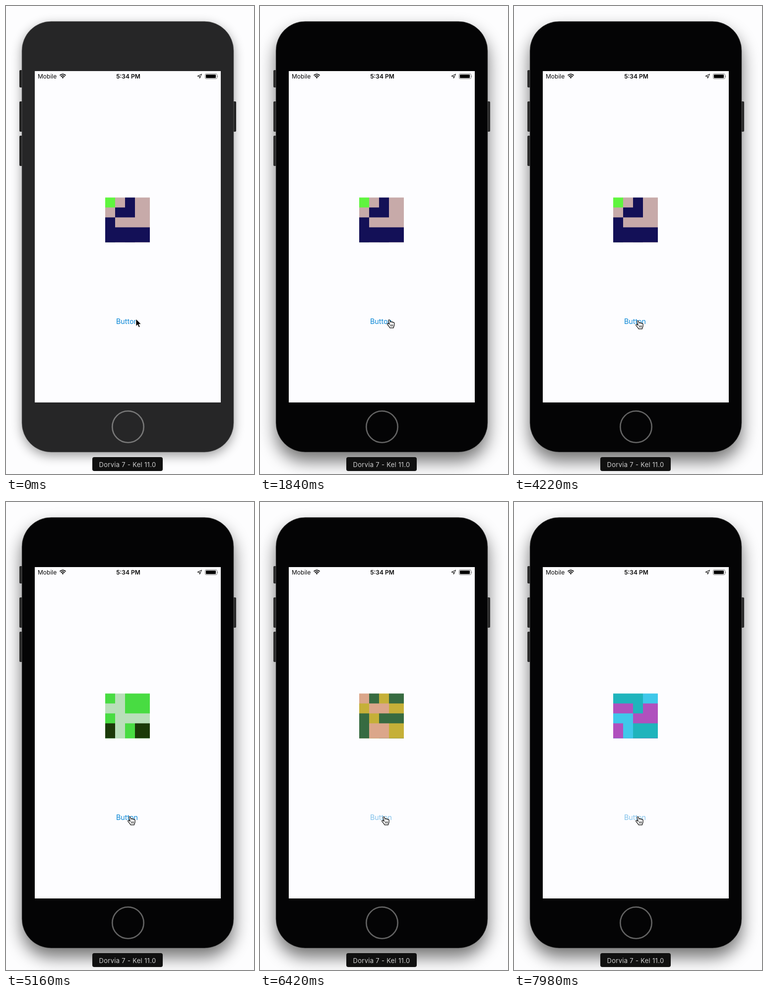
Animation of 500 by 942 pixels, one loop 8 s. Source, as an HTML page:

```html
<!DOCTYPE html>
<html lang="en">
<head>
<meta charset="utf-8">
<title>Phone simulator</title>
<style>
  html, body { margin: 0; width: 100%; height: 100%; overflow: hidden; background: #fdfdfe; }
  svg { display: block; width: 100%; height: 100%; }
  text { font-family: Inter, Roboto, sans-serif; }
  .idle { --body: #262627; --side: #222222; --ring: #787878; }
  .active { --body: #040405; --side: #2a2a2a; --ring: #646464; }
  .idle .deep, .active .light { display: none; }
</style>
</head>
<body>
<svg id="stage" class="idle" viewBox="0 0 500 942">
  <defs>
    <filter id="soft" x="-20%" y="-20%" width="140%" height="140%"><feGaussianBlur stdDeviation="11"/></filter>
    <filter id="wide" x="-20%" y="-20%" width="140%" height="140%"><feGaussianBlur stdDeviation="17"/></filter>
  </defs>
  <rect width="500" height="942" fill="#fdfdfe"/>
  <rect class="light" x="32" y="38" width="427" height="867" rx="59" opacity=".38" filter="url(#soft)"/>
  <rect class="deep" x="32" y="49" width="427" height="867" rx="59" opacity=".55" filter="url(#wide)"/>

  <g fill="var(--side)">
    <rect x="27" y="129" width="9" height="35" rx="2"/>
    <rect x="27" y="192" width="9" height="61" rx="2"/>
    <rect x="27" y="261" width="9" height="61" rx="2"/>
    <rect x="455" y="192" width="9" height="61" rx="2"/>
  </g>
  <rect x="32" y="31" width="427" height="867" rx="59" fill="var(--body)" stroke="#777" stroke-width=".6"/>
  <rect x="58" y="131" width="375" height="667" fill="#fdfdff"/>
  <circle cx="246" cy="847" r="31.7" fill="none" stroke="var(--ring)" stroke-width="2.6"/>

  <g font-size="12" fill="#080808">
    <text x="64" y="146">Mobile</text>
    <text x="246.5" y="146" text-anchor="middle" font-weight="600">5:34 PM</text>
  </g>
  <g fill="none" stroke="#080808" stroke-width="1.8">
    <path d="M108.5 139.7Q114.5 134.5 120.5 139.7M110.7 142.2Q114.5 138.9 118.3 142.2"/>
    <path d="M112.4 143.6Q114.5 142 116.6 143.6L114.5 146Z" fill="#080808" stroke="none"/>
    <path d="M386 141.3L394.5 137L390.5 145.5V141.3Z" stroke-width="1"/>
    <rect x="401.5" y="136.5" width="24" height="10" rx="2.3" stroke="#777" stroke-width="1"/>
  </g>
  <rect x="403" y="138" width="20" height="7" rx="1"/>
  <path d="M426.5 139.5q1.5 2 0 4z" fill="#777"/>

  <g id="tiles"></g>
  <text id="button" x="222" y="640" font-size="14.3" fill="#0a87d6">Button</text>

  <rect x="174" y="908" width="142" height="28" rx="4" fill="#101010"/>
  <text x="245" y="928" font-size="13" letter-spacing=".3" fill="#cfcfcf" text-anchor="middle">Dorvia 7 - Kel 11.0</text>

  <path id="arrow" transform="translate(262 630)" d="M0 0V14.5L3.4 11.4L5.7 16.8L8.2 15.7L5.9 10.5H10.4Z" stroke="#fff" stroke-width=".8"/>
  <g id="hand" stroke="#080808" stroke-width="1.2" stroke-linejoin="round" stroke-linecap="round">
    <path fill="#fff" d="M-2.3 1.5L-4.3-5.8C-4.8-8-2.2-8.6-1.5-6.5L-.2-2.8C0-4.6 2.4-4.4 2.6-2.6C3.2-4 5-3.6 5.2-2C6.2-2.9 7.5-2.2 7.5-.8V3C7.5 5 6 6 5.8 8.6H-1.5C-2 6.5-4.5 4.4-6.4 1.8C-7.7-.2-5.6-1.4-4.2-.1Z"/>
    <path fill="none" stroke-width=".9" d="M.2 2V5.5M2.4 2V5.5M4.6 2V5.5"/>
  </g>
</svg>
<script>
const LOOP = 8000, FOCUS = 840;
const LEFT = 200, TOP = 385.5, EDGES = [0, 20, 40, 60, 90];
const patterns = [
  { start: 0, colors: ['#5ff53f', '#c7aaa9', '#131057'], cells: '0121 1221 2111 2222' },
  { start: 4500, colors: ['#48dc42', '#b9dfba', '#1b3a08'], cells: '0100 1100 0111 2102' },
  { start: 6260, colors: ['#dba68a', '#376b41', '#c5b038'], cells: '0121 2002 1211 1002' },
  { start: 7840, colors: ['#1fb4bc', '#3fc8ea', '#b050be'], cells: '0001 2202 1122 2100' }
];
const [stage, tiles, button, arrow, hand] =
  ['stage', 'tiles', 'button', 'arrow', 'hand'].map(id => document.getElementById(id));

const clamp = v => Math.min(1, Math.max(0, v));
const ease = (t, from, to) => {
  const p = clamp((t - from) / (to - from));
  return p * p * (3 - 2 * p);
};

// Each tile reaches down to the bottom edge, so later rows cover it without seams.
function tileMarkup({ colors, cells }) {
  return cells.split(' ').map((row, r) => [...row].map((c, i) =>
    `<rect x="${LEFT + EDGES[i]}" y="${TOP + EDGES[r]}" width="${EDGES[i + 1] - EDGES[i]}" ` +
    `height="${EDGES[4] - EDGES[r]}" fill="${colors[c]}"/>`).join('')).join('');
}

// The button dims while pressed, then fades back after release.
function buttonOpacity(t) {
  const pressed = patterns.slice(1).find(p => t >= p.start - 120 && t < p.start + 420);
  return pressed ? 0.5 + 0.5 * ease(t, pressed.start + 170, pressed.start + 420) : 1;
}

let shown;
function draw(now) {
  const t = now % LOOP, focused = t >= FOCUS;
  const current = patterns.findLast(p => t >= p.start);
  if (current !== shown) {
    tiles.innerHTML = tileMarkup(current);
    shown = current;
  }
  stage.setAttribute('class', focused ? 'active' : 'idle');
  arrow.style.display = focused ? 'none' : '';
  hand.style.display = focused ? '' : 'none';
  const first = ease(t, 2500, 3100), second = ease(t, 3340, 4000);
  hand.setAttribute('transform',
    `translate(${263.3 - 6.5 * first - 4.2 * second} ${639.3 + first + second})`);
  button.setAttribute('opacity', buttonOpacity(t));
  requestAnimationFrame(draw);
}
draw(0);
</script>
</body>
</html>
```
